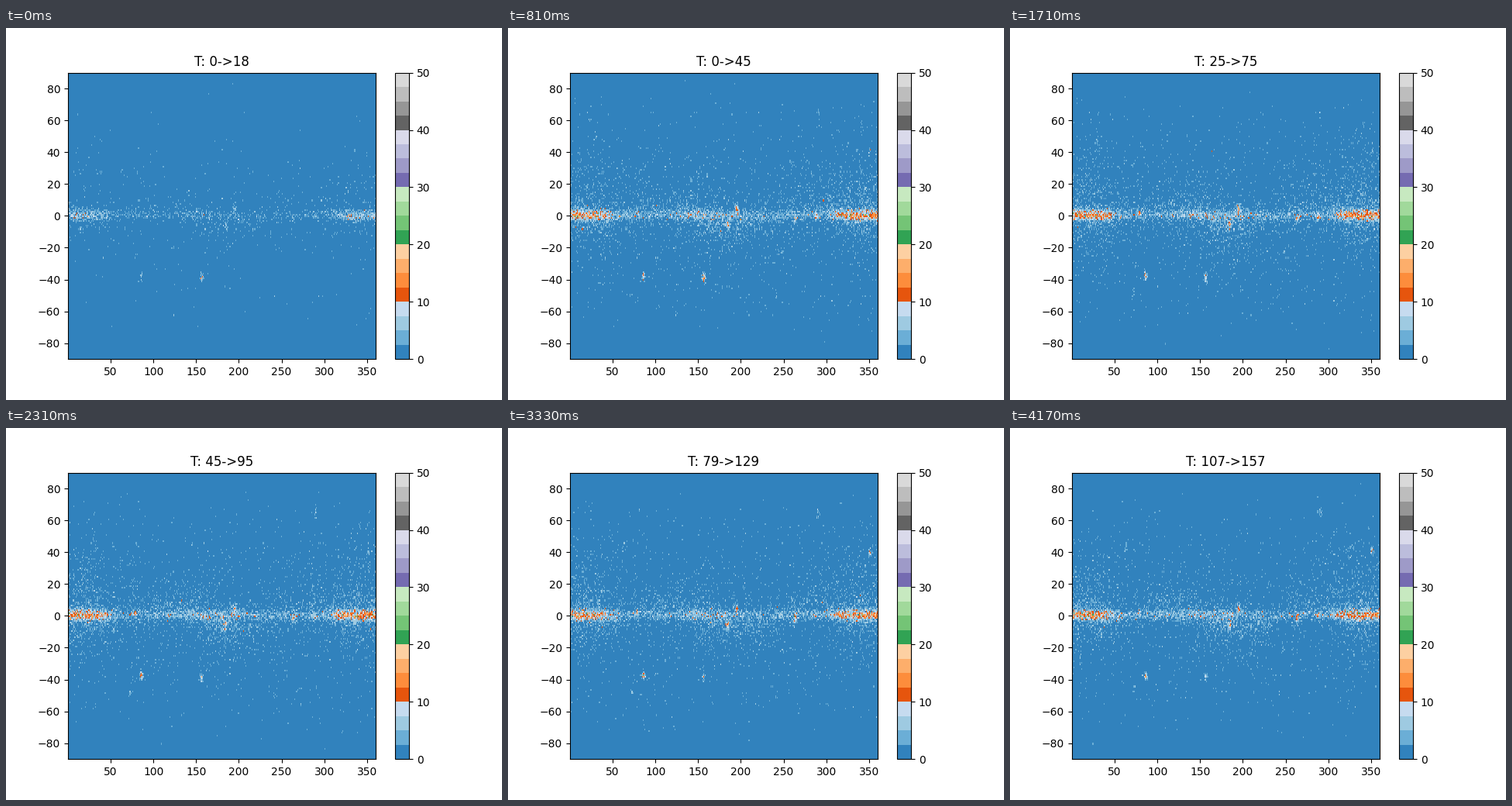
Write a matplotlib script that moves like this. It is 640 px wide and 480 px high and loops after 4200 ms.

```python
import numpy as np
import matplotlib.pyplot as plt
from matplotlib.animation import FuncAnimation

FRAMES, STEP_MS = 140, 30
FIRST, WINDOW = 18, 50
DAYS = FRAMES + FIRST

rng = np.random.default_rng(12)
lon, lat = np.meshgrid(np.arange(0.5, 360), np.arange(-89.5, 90))


def blob(l0, b0, sl=1.4, sb=1.8):
    """Gaussian patch on the sky, wrapped in longitude."""
    dl = (lon - l0 + 180) % 360 - 180
    return np.exp(-0.5 * ((dl / sl) ** 2 + ((lat - b0) / sb) ** 2))


def diffuse_sky():
    """Bright plane, warped halo and flat background, in counts per window."""
    from_centre = np.abs((lon + 180) % 360 - 180)
    inner = 1 / (1 + np.exp((from_centre - 47) / 5))
    outer = np.exp(-((lon - 170) / 45) ** 2)
    wave = np.radians(2 * (lon - 155))
    plane = 2.7 + 0.7 * np.cos(wave) + 6.2 * inner
    plane = plane * np.exp(-0.5 * ((lat - 0.3) / 2.1) ** 2)
    warp = -7 * np.sin(wave) * (1 - inner)
    halo = (1.1 + 1.0 * outer + 1.1 * inner) * np.exp(
        -np.abs(lat - warp) / (8 + 3 * outer + 3 * inner))
    bulge = 0.45 * blob(350, 25, 45, 22)
    return (plane + halo + bulge + 0.42) * np.cos(np.radians(lat))


def point_sources():
    """A few strong sources and many faint random ones."""
    strong = [(263.5, -2, 9), (195, 4.5, 9), (184.5, -5.8, 8), (79, 1.5, 5),
              (288, 0, 4), (86, -38, 8), (290, 64.5, 3)]
    sky = sum(amp * blob(l, b) for l, b, amp in strong)
    for _ in range(40):
        l, b = rng.uniform(0, 360), np.degrees(np.arcsin(rng.uniform(-1, 1)))
        sky = sky + rng.exponential(0.5) * blob(l, b)
    return sky


# variable sources and their light curves
FLARES = [
    (blob(156.5, -39), lambda t: 5 + 18 * np.exp(-t / 30)),
    (blob(86, -38), lambda t: 5 * np.exp(-((t - 90) / 30) ** 2)),
    (blob(351, 40), lambda t: 3 + 4 * (t > 95)),
    (blob(62.5, 43), lambda t: 3 * (t > 95)),
]


def simulate():
    """Running total of counts per cell, one layer per day."""
    sky = diffuse_sky() + point_sources()
    total = np.zeros((DAYS, *sky.shape), dtype=np.int16)
    for t in range(DAYS - 1):
        rate = sky * (1 + 0.25 * np.exp(-t / 25))
        rate = rate + sum(curve(t) * spot for spot, curve in FLARES)
        hits = rng.poisson(rate / WINDOW / 1.5)
        # each hit brings one or two counts
        total[t + 1] = total[t] + hits * rng.integers(1, 3, hits.shape)
    return total


total = simulate()

fig, ax = plt.subplots(figsize=(6.4, 4.8), dpi=100)
im = ax.imshow(total[FIRST], cmap="tab20c", vmin=0, vmax=50, origin="lower",
               extent=(0.01, 360, -90, 90), aspect="auto",
               interpolation="nearest")
fig.colorbar(im)
title = ax.set_title("")


def update(i):
    end = FIRST + i
    start = max(0, end - WINDOW)
    im.set_data(total[end] - total[start])
    title.set_text(f"T: {start}->{end}")
    return im, title


anim = FuncAnimation(fig, update, frames=FRAMES, interval=STEP_MS,
                     repeat=True, repeat_delay=0)
plt.show()
```
